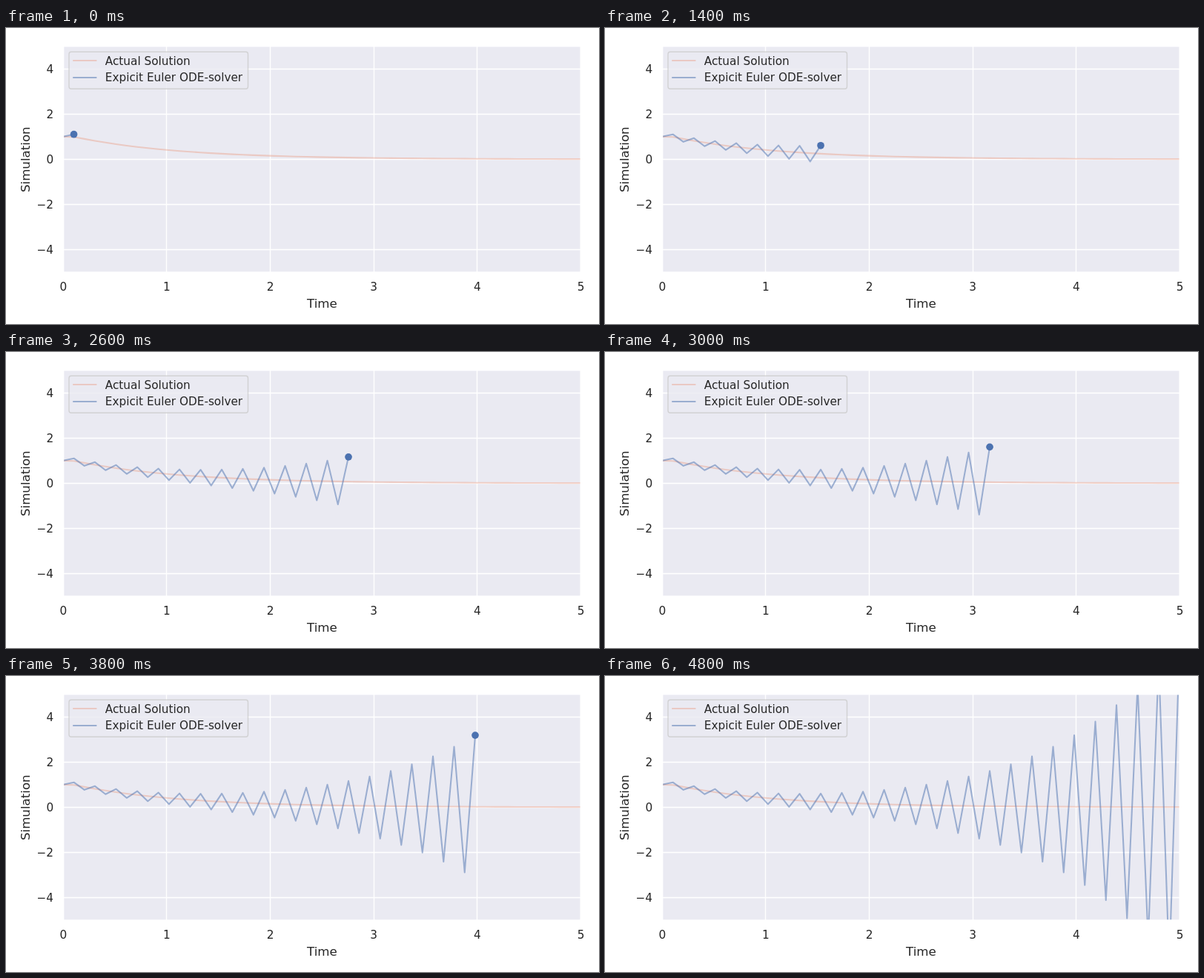
Recreate the animation shown at these times as an HTML page. Size 800 px wide and 400 px high, loop 4.9 s.

```html
<!DOCTYPE html>
<html lang="en">
<head>
<meta charset="utf-8">
<title>Euler solver</title>
<style>
  html, body { margin: 0; width: 100%; height: 100%; overflow: hidden; background: #fff; }
  svg { display: block; width: 800px; height: 400px; }
  text { font: 15.28px "DejaVu Sans", sans-serif; fill: #262626; }
  .title { font-size: 16.67px; text-anchor: middle; }
  .grid line { stroke: #fff; stroke-width: 1.39; }
  .curve { fill: none; stroke-width: 2.08; stroke-linejoin: round; stroke-linecap: round; }
  .exact { stroke: #e9967a; stroke-opacity: .4; }
  .euler { stroke: #4c72b0; stroke-opacity: .5; }
</style>
</head>
<body>
<svg viewBox="0 0 800 400">
  <defs>
    <clipPath id="plot"><rect x="77.3" y="24.6" width="698.2" height="305.5"/></clipPath>
  </defs>
  <rect x="77.3" y="24.6" width="698.2" height="305.5" fill="#eaeaf2"/>
  <g class="grid" id="grid"></g>
  <g clip-path="url(#plot)">
    <polyline class="curve exact" id="exact"/>
    <polyline class="curve euler" id="euler"/>
    <circle id="dot" r="4.86" fill="#4c72b0"/>
  </g>
  <rect x="77.3" y="24.6" width="698.2" height="305.5" fill="none" stroke="#fff" stroke-width="1.74"/>
  <g id="labels"></g>
  <text class="title" x="426.4" y="378">Time</text>
  <text class="title" transform="translate(32.3 177.7) rotate(-90)">Simulation</text>

  <rect x="85" y="32.3" width="241.5" height="50" rx="3" fill="#eaeaf2" stroke="#ccc"
        stroke-width="1.39" opacity=".8"/>
  <path class="curve exact" d="M91 44H121.6"/>
  <path class="curve euler" d="M91 67H121.6"/>
  <text x="133.8" y="50">Actual Solution</text>
  <text x="133.8" y="72">Expicit Euler ODE-solver</text>
</svg>
<script>
  const STEPS = 49, FRAME = 100, H = 5 / STEPS;
  // Stiff decay: one slow and one fast mode, y = A e^(-slow t) - B e^(-fast t)
  const B = 0.1018, A = 1 + B, SLOW = 0.98, FAST = 20.503;

  const $ = id => document.getElementById(id);
  const px = t => 77.3 + t * 139.64;
  const py = y => 177.4 - y * 30.55;
  const snap = v => Math.floor(v) + 0.5;

  function add(parent, tag, attrs, content = "") {
    const el = document.createElementNS("http://www.w3.org/2000/svg", tag);
    for (const key in attrs) el.setAttribute(key, attrs[key]);
    el.textContent = content;
    parent.append(el);
  }

  for (let t = 0; t <= 5; t++) {
    const x = snap(px(t));
    add($("grid"), "line", { x1: x, x2: x, y1: 24.6, y2: 330.1 });
    add($("labels"), "text", { x: px(t), y: 355, "text-anchor": "middle" }, t);
  }
  for (let v = -4; v <= 4; v += 2) {
    const y = snap(py(v));
    add($("grid"), "line", { x1: 77.3, x2: 775.5, y1: y, y2: y });
    add($("labels"), "text", { x: 64.1, y: Math.round(py(v) + 5.6), "text-anchor": "end" },
      String(v).replace("-", "\u2212"));
  }

  const sample = f => Array.from({ length: STEPS + 1 }, (_, n) => [px(n * H), py(f(n))]);
  const exact = sample(n => A * Math.exp(-SLOW * n * H) - B * Math.exp(-FAST * n * H));
  const euler = sample(n => A * (1 - SLOW * H) ** n - B * (1 - FAST * H) ** n);
  $("exact").setAttribute("points", exact.join(" "));

  function draw() {
    const last = Math.floor(performance.now() / FRAME) % STEPS + 1;
    $("euler").setAttribute("points", euler.slice(0, last + 1).join(" "));
    $("dot").setAttribute("cx", euler[last][0]);
    $("dot").setAttribute("cy", euler[last][1]);
    requestAnimationFrame(draw);
  }
  draw();
</script>
</body>
</html>
```
